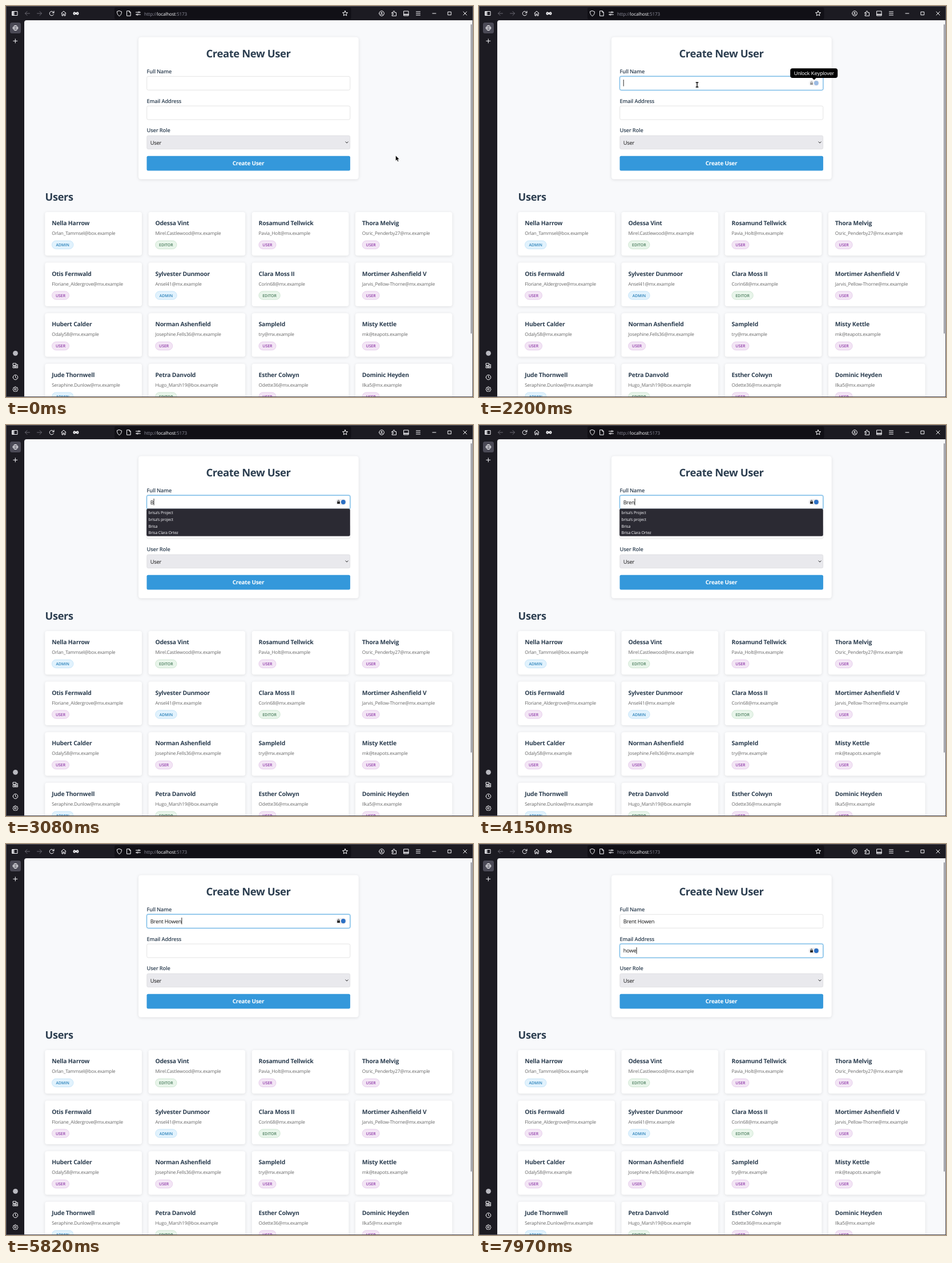
Animation, 818 px wide and 685 px high, one loop 8 s. Source, as an HTML page:

```html
<!DOCTYPE html>
<html lang="en">
<head>
<meta charset="utf-8">
<title>Create New User</title>
<style>
  html, body { margin: 0; width: 100%; height: 100%; overflow: hidden; background: #1c1b22; }
  svg { display: block; }
  text { font-family: "Open Sans", "Noto Sans", sans-serif; letter-spacing: -.02em; white-space: pre; text-rendering: geometricPrecision; }
  .bold { font-weight: 700; }
  .semi { font-weight: 600; }
  .mid { text-anchor: middle; }
  .ink { fill: #2c3e50; }
  .card { fill: #fff; filter: drop-shadow(0 1px 2.5px rgba(0, 0, 0, .11)); }
  .icon { fill: none; stroke: #fbfbfe; stroke-width: 1; stroke-linejoin: round; stroke-linecap: round; }
  .dim { stroke: #6a6972; }
  .field { font-size: 9.3px; fill: #111; }
</style>
</head>
<body>
<script>
const LOOP = 8000;

const text = (x, y, size, str, cls = "", attrs = "") =>
  `<text x="${x}" y="${y}" font-size="${size}" class="${cls}" ${attrs}>${str}</text>`;
const rect = (x, y, w, h, r, attrs) =>
  `<rect x="${x}" y="${y}" width="${w}" height="${h}" rx="${r}" ${attrs}/>`;
// Icons are drawn around their own centre.
const icon = (x, y, d, cls = "") =>
  `<path class="icon ${cls}" transform="translate(${x} ${y})" d="${d}"/>`;
const ring = r => `M${-r} 0a${r} ${r} 0 1 0 ${2 * r} 0a${r} ${r} 0 1 0 ${-2 * r} 0z`;

const badges = {
  ADMIN: { w: 37.5, fill: "#e1f2fd", line: "#b9dff7", ink: "#2980b9" },
  EDITOR: { w: 37.3, fill: "#e8f5ea", line: "#c3dfc7", ink: "#47795a" },
  USER: { w: 30, fill: "#f3e5f5", line: "#dfc0e6", ink: "#8e3aa8" }
};

const users = [
  ["Nella Harrow", "Orlan_Tammsel@box.example", "ADMIN"],
  ["Odessa Vint", "Mirel.Castlewood@mx.example", "EDITOR"],
  ["Rosamund Tellwick", "Pavia_Holt@mx.example", "USER"],
  ["Thora Melvig", "Osric_Penderby27@mx.example", "USER"],
  ["Otis Fernwald", "Floriane_Aldergrove@mx.example", "USER"],
  ["Sylvester Dunmoor", "Ansel41@mx.example", "ADMIN"],
  ["Clara Moss II", "Corin68@mx.example", "EDITOR"],
  ["Mortimer Ashenfield V", "Jarvis_Pellow-Thorne@mx.example", "USER"],
  ["Hubert Calder", "Odaly58@mx.example", "USER"],
  ["Norman Ashenfield", "Josephine.Fells36@mx.example", "USER"],
  ["SampleId", "try@mx.example", "USER"],
  ["Misty Kettle", "mk@teapots.example", "USER"],
  ["Jude Thornwell", "Seraphine.Dunlow@mx.example", "ADMIN"],
  ["Petra Danvold", "Hugo_Marsh19@box.example", "EDITOR"],
  ["Esther Colwyn", "Odette36@mx.example", "USER"],
  ["Dominic Heyden", "Ilka5@mx.example", "USER"]
];

function userCard([name, email, role], i) {
  const x = 68.3 + (i % 4) * 181.2, y = 361 + Math.floor(i / 4) * 88.6, b = badges[role];
  return rect(x, y, 169.7, 76.3, 4, 'class="card"') +
    text(x + 11.9, y + 23, 10.4, name, "bold ink") +
    text(x + 11.9, y + 40, 8.2, email, "", 'fill="#666"') +
    rect(x + 12.2, y + 50.2, b.w, 14.4, 7.2, `fill="${b.fill}" stroke="${b.line}" stroke-width=".7"`) +
    text(x + 12.2 + b.w / 2, y + 60, 6.9, role, "semi mid", `fill="${b.ink}" style="letter-spacing:0"`);
}

function browserChrome() {
  const tools = [
    [15.5, 13, "M-4.5-3.5h9v7h-9zM-3.8-3.5v7M-2.6-3.5v7M-1.6-3.5v7"],
    [37.5, 13, "M4 0H-4M-.5-3.5L-4 0-.5 3.5", "dim"],
    [58.5, 13, "M-4 0H4M.5-3.5L4 0 .5 3.5", "dim"],
    [80, 13, "M3.7-1A3.8 3.8 0 1 0 3.5 1.7M4-4v3H1"],
    [101, 13, "M-4-.3L0-4 4-.3M-3-1v5h2V1h2v3h2v-5"],
    [198.5, 13, "M0-4.5L4-3C4 1 2.5 3.3 0 4.6-2.5 3.3-4 1-4-3z"],
    [215, 13, "M-3-4.3h4L3.2-2v6.3H-3zM1-4.3V-2h2.2"],
    [231.5, 13, "M-4-2h4M2.5-2H4M-4 2h1.5M0 2h4M0-2a1.2 1.2 0 1 0 2.4 0 1.2 1.2 0 1 0-2.4 0M-2.5 2a1.2 1.2 0 1 0 2.4 0 1.2 1.2 0 1 0-2.4 0"],
    [594, 13, "M0-4.5L1.3-1.5 4.5-1.3 2.1.9 2.8 4 0 2.3-2.8 4-2.1.9-4.5-1.3-1.3-1.5z"],
    [658, 13, ring(4.3) + "M-2.4 2.6C-1.5.8 1.5.8 2.4 2.6M-1-1a1 1 0 1 0 2 0 1 1 0 1 0-2 0"],
    [680, 13, "M-3.8-1.5h2V-3c0-1.8 2.6-1.8 2.6 0v1.5h2.7v5.8h-7.3V2h1.5c1.4 0 1.4-2 0-2h-1.5z"],
    [701, 13, "M-4-4h8v8h-8zM-4 1.3h8M-4 2.2h8"],
    [722, 13, "M-3.5-3h7M-3.5 0h7M-3.5 3h7"],
    [750, 13, "M-3 0h6"],
    [777, 13, "M-2.7-2.7h5.4v5.4h-5.4z"],
    [804, 13, "M-3-3l6 6M3-3l-6 6"],
    [16.5, 38.5, ring(4.2) + "M-4.2 0h8.4M0-4.2c-2.6 2.4-2.6 6 0 8.4 2.6-2.4 2.6-6 0-8.4"],
    [16.3, 61.3, "M-3.5 0h7M0-3.5v7"],
    [16.5, 630, "M-4-4h5v3.5h-5zM-4 1h8v3h-8zM-2 2.5h4M2-2h2v2"],
    [16.5, 650.5, ring(4.2) + "M0-2.5V0l1.8 1.3"],
    [16.5, 671.3, ring(1.5) + "M0-4.5L1.3-3 3.4-3 3.6-1 4.6.5 3.4 2 3 3.7 1 3.6 0 4.6-1 3.6-3 3.7-3.4 2-4.6.5-3.6-1-3.4-3-1.3-3z"]
  ];
  return rect(190, 2.5, 414.5, 21, 3, 'fill="#111016"') +
    rect(7, 29, 19, 19, 3.5, 'fill="#4b4a56"') +
    tools.map(t => icon(...t)).join("") +
    `<path class="icon" style="stroke-width:1.9" transform="translate(122.5 13)" d="M0 0C-1.2-1.6-4-2.8-4 0S-1.2 1.6 0 0 4-2.8 4 0 1.2 1.6 0 0"/>` +
    '<circle cx="16.5" cy="608.3" r="4.4" fill="#b9b9c0"/>' +
    text(242, 16.6, 8.1, 'http://<tspan fill="#fbfbfe">localhost</tspan>:5173', "", 'fill="#8f8f9d"');
}

const inputBox = (id, y) =>
  rect(245.9, y - .6, 357.6, 25.7, 3.5, `id="${id}Glow" fill="none" stroke="#3498db" stroke-width="1.2"`) +
  rect(246.7, y + .3, 356, 24, 2.5, `id="${id}Box" fill="#fff" stroke-width=".8"`) +
  `<text id="${id}Text" class="field" x="252.7" y="${y + 15.5}"></text>`;

function form() {
  return rect(232, 54.5, 385.7, 249, 4.5, 'class="card"') +
    text(424.5, 89.7, 18.4, "Create New User", "bold mid ink") +
    text(246.5, 118, 9.3, "Full Name", "semi ink") +
    text(246.5, 169.8, 9.3, "Email Address", "semi ink") +
    text(246.5, 221.4, 9.3, "User Role", "semi ink") +
    inputBox("name", 123) + inputBox("email", 174.8) +
    rect(246.8, 227.1, 355.8, 23.6, 2.5, 'fill="#e9e9ed" stroke="#dcdce0" stroke-width=".8"') +
    text(252.7, 242.6, 9.3, "User", "field") +
    '<path class="icon" style="stroke:#222" transform="translate(597 239)" d="M-2.2-1.1L0 1.1 2.2-1.1"/>' +
    rect(246.5, 262.8, 356.4, 25.6, 2.5, 'fill="#3498db"') +
    text(424.5, 279.2, 9.9, "Create User", "bold mid", 'fill="#fff"');
}

function overlays() {
  const hints = ["brisa's Project", "brisa's project", "Brisa", "Brisa Clara Ortez"];
  return `<g id="badge">${rect(577.5, -5.3, 18.5, 10.6, 5, 'fill="#ececef"')}
      <path d="M580.1-.8h4.8v3.8h-4.8z" fill="#222"/>
      <path d="M581.2-.8v-1a1.3 1.3 0 0 1 2.6 0v1" fill="none" stroke="#222" stroke-width=".9"/>
      <circle cx="590.8" r="3.9" fill="#2a6fc4"/></g>
    <g id="tooltip">${rect(545.2, 109.3, 83, 16.6, 4, "")}<path d="M583 125.5h8l-4 4z"/>
      <text class="mid" x="586.7" y="121" font-size="9" fill="#fff" style="font-family:'Liberation Sans',sans-serif;letter-spacing:0">Unlock Keyplover</text></g>
    <g id="hints">${rect(246.3, 146.8, 356.2, 47.8, 2.5, 'fill="#2b2a33" stroke="#45444e" stroke-width=".6"')}
      ${hints.map((h, i) => text(249.5, 156 + i * 11.8, 7, h, "", 'fill="#fbfbfe"')).join("")}</g>
    <path id="caret" d="M0-6V5.6" stroke="#111" stroke-width=".9"/>
    <path id="arrow" d="M0 0v9.2l2.1-1.9 1.5 3.3 1.6-.7-1.5-3.2h2.9z" stroke="#fff" stroke-width=".5"/>
    <path id="beam" d="M-2.3-4H2.3M0-4V4M-2.3 4H2.3" stroke="#000" stroke-width="1.3"/>`;
}

document.body.innerHTML = `<svg width="818" height="685" viewBox="0 0 818 685">
  <rect width="818" height="685" fill="#1c1b22"/>
  <path d="M32 684V29a4 4 0 0 1 4-4H817V684z" fill="#f8f9fb"/>
  <clipPath id="page"><path d="M32 25H817V684H32z"/></clipPath>
  ${browserChrome()}
  <g clip-path="url(#page)">${form()}${text(68.6, 341.4, 18.2, "Users", "bold ink")}${users.map(userCard).join("")}</g>
  ${rect(814, 32, 2, 542, 1, 'fill="#8f8f98"')}
  <path d="M.5 684.5V.5H817.5V684.5z" fill="none" stroke="#55545d"/>
  ${overlays()}</svg>`;

const el = id => document.getElementById(id);
const clamp = v => Math.min(1, Math.max(0, v));
const show = (id, on) => el(id).setAttribute("visibility", on ? "visible" : "hidden");
const move = (id, x, y) => el(id).setAttribute("transform", `translate(${x} ${y})`);

const fields = {
  name: { y: 135, focus: 2010, caret: 2140, blur: 6020, value: "Brent Howen",
    keys: [2940, 3280, 3880, 4150, 4480, 4680, 5150, 5350, 5490, 5690, 5820] },
  email: { y: 187, focus: 6020, caret: 6030, blur: LOOP, value: "howe",
    keys: [7430, 7500, 7700, 7970] }
};

// time, x, y
const pointer = [
  [0, 682.5, 262], [70, 682.5, 262], [330, 629, 232], [860, 629, 232],
  [1130, 634, 232], [1530, 634, 232], [2070, 382, 138]
];

function pointerAt(t) {
  const i = pointer.findIndex(p => p[0] > t);
  if (i < 0) return pointer.at(-1).slice(1);
  const [t0, x0, y0] = pointer[i - 1], [t1, x1, y1] = pointer[i];
  const p = (t - t0) / (t1 - t0), e = p * p * (3 - 2 * p);
  return [x0 + (x1 - x0) * e, y0 + (y1 - y0) * e];
}

function drawField(id, f, t) {
  const focus = clamp((t - f.focus) / 200) * (1 - clamp((t - f.blur) / 250));
  const mix = (a, b) => Math.round(a + (b - a) * focus);
  el(id + "Box").setAttribute("stroke", `rgb(${mix(221, 52)},${mix(221, 152)},${mix(221, 219)})`);
  el(id + "Glow").setAttribute("opacity", focus * .22);

  const typed = f.keys.filter(k => k <= t).length;
  el(id + "Text").textContent = f.value.slice(0, typed);

  if (t >= f.caret && t < f.blur) {
    const last = typed ? f.keys[typed - 1] : f.caret;
    show("caret", (t - last) % 1060 < 530);
    move("caret", 253.2 + (typed ? el(id + "Text").getComputedTextLength() : 0), f.y);
    show("badge", true);
    move("badge", 0, f.y);
    el("badge").setAttribute("opacity", clamp((t - f.caret + 60) / 260));
  }
}

function draw(t) {
  show("caret", false);
  show("badge", false);
  for (const id in fields) drawField(id, fields[id], t);

  const [x, y] = pointerAt(t);
  const overInput = x > 246 && x < 603 && Object.values(fields).some(f => Math.abs(y - f.y) < 12.3);
  const visible = t < 2940;
  show("arrow", visible && !overInput);
  show("beam", visible && overInput);
  move("arrow", x, y);
  move("beam", x, y);

  show("tooltip", t >= 2140 && t < 2940);
  show("hints", t >= 3080 && t < 4220);
}

function tick() {
  draw(performance.now() % LOOP);
  requestAnimationFrame(tick);
}
tick();
</script>
</body>
</html>
```
